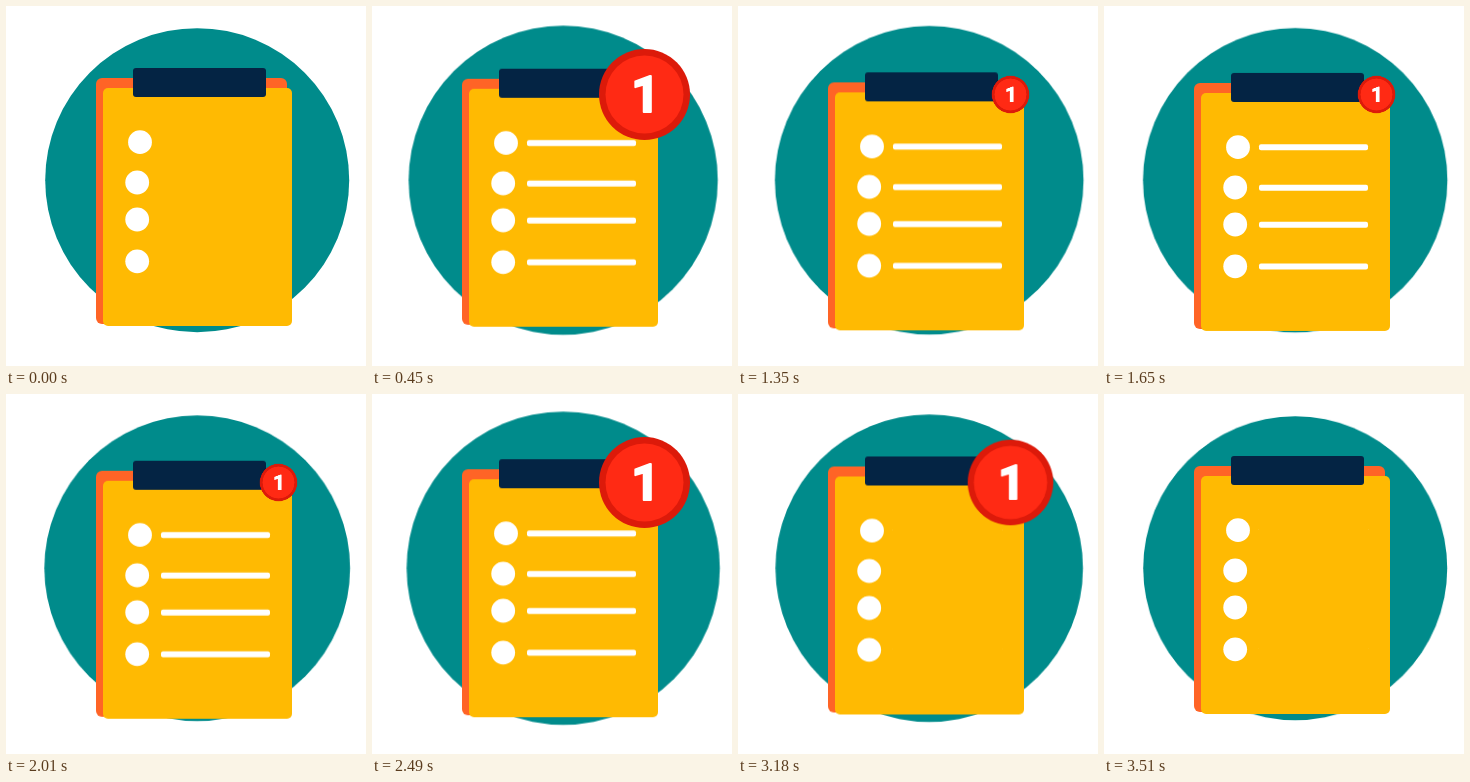
Write an HTML page that moves like this. It is 360 by 360 pixels and loops after 3540 ms.

```html
<!DOCTYPE html>
<html lang="en">
<head>
<meta charset="utf-8">
<title>Checklist</title>
<style>
  html, body { margin: 0; width: 100%; height: 100%; overflow: hidden; background: #fff; }
  svg { display: block; width: 100vw; height: 100vh; }

  .disc, .badge { transform-box: fill-box; transform-origin: center; }
  .disc  { fill: #008b8b; animation: breathe 885ms cubic-bezier(.37, 0, .63, 1) infinite alternate; }
  .board { animation: sink 1770ms cubic-bezier(.37, 0, .63, 1) infinite alternate; }
  .badge { transform-origin: 272.5px 88.5px; transform-box: view-box; animation: pop 3540ms ease-in-out infinite; }
  .badge text { font: 700 50px Roboto, "Open Sans", sans-serif; fill: #fff; stroke: #fff; stroke-width: 2; stroke-linejoin: round; }
  .lines rect { animation: write 3540ms linear calc(var(--i) * 74ms) infinite backwards; }

  @keyframes breathe { from { transform: scale(1); } to { transform: scale(1.033); } }
  @keyframes sink { from { transform: translateY(0); } to { transform: translateY(5px); } }
  @keyframes write {
    0%, 1.13% { width: 0; }
    5.37%, 70.62% { width: 109px; }
    82.06%, 100% { width: 0; }
  }
  @keyframes pop {
    0%, 3.4% { transform: scale(0); }
    11.9%, 22% { transform: scale(1); }
    30.5%, 60.2% { transform: scale(.41); }
    68.6%, 88.4% { transform: scale(1); }
    96.9%, 100% { transform: scale(0); }
  }
</style>
</head>
<body>
<svg viewBox="0 0 360 360">
  <circle class="disc" cx="191.2" cy="174.2" r="152"/>
  <g class="board">
    <rect x="90" y="72" width="191" height="246" rx="6" fill="#ff6426"/>
    <rect x="97" y="82" width="189" height="238" rx="5" fill="#ffba02"/>
    <rect x="127" y="62" width="133" height="29" rx="3" fill="#042444"/>
    <g fill="#fff">
      <circle cx="134" cy="136.2" r="11.9"/>
      <circle cx="131.2" cy="176.5" r="11.9"/>
      <circle cx="131.2" cy="213.5" r="11.9"/>
      <circle cx="131.2" cy="255.3" r="11.9"/>
    </g>
    <g class="lines" fill="#fff">
      <rect style="--i:0" x="155" y="133.3" width="109" height="6" rx="2"/>
      <rect style="--i:1" x="155" y="173.8" width="109" height="6" rx="2"/>
      <rect style="--i:2" x="155" y="210.8" width="109" height="6" rx="2"/>
      <rect style="--i:3" x="155" y="252.5" width="109" height="6" rx="2"/>
    </g>
  </g>
  <g class="badge">
    <circle cx="272.5" cy="88.5" r="45.5" fill="#dc1a0a"/>
    <circle cx="272.5" cy="88.5" r="39" fill="#ff2a14"/>
    <text x="273.5" y="106" text-anchor="middle">1</text>
  </g>
</svg>
</body>
</html>
```
